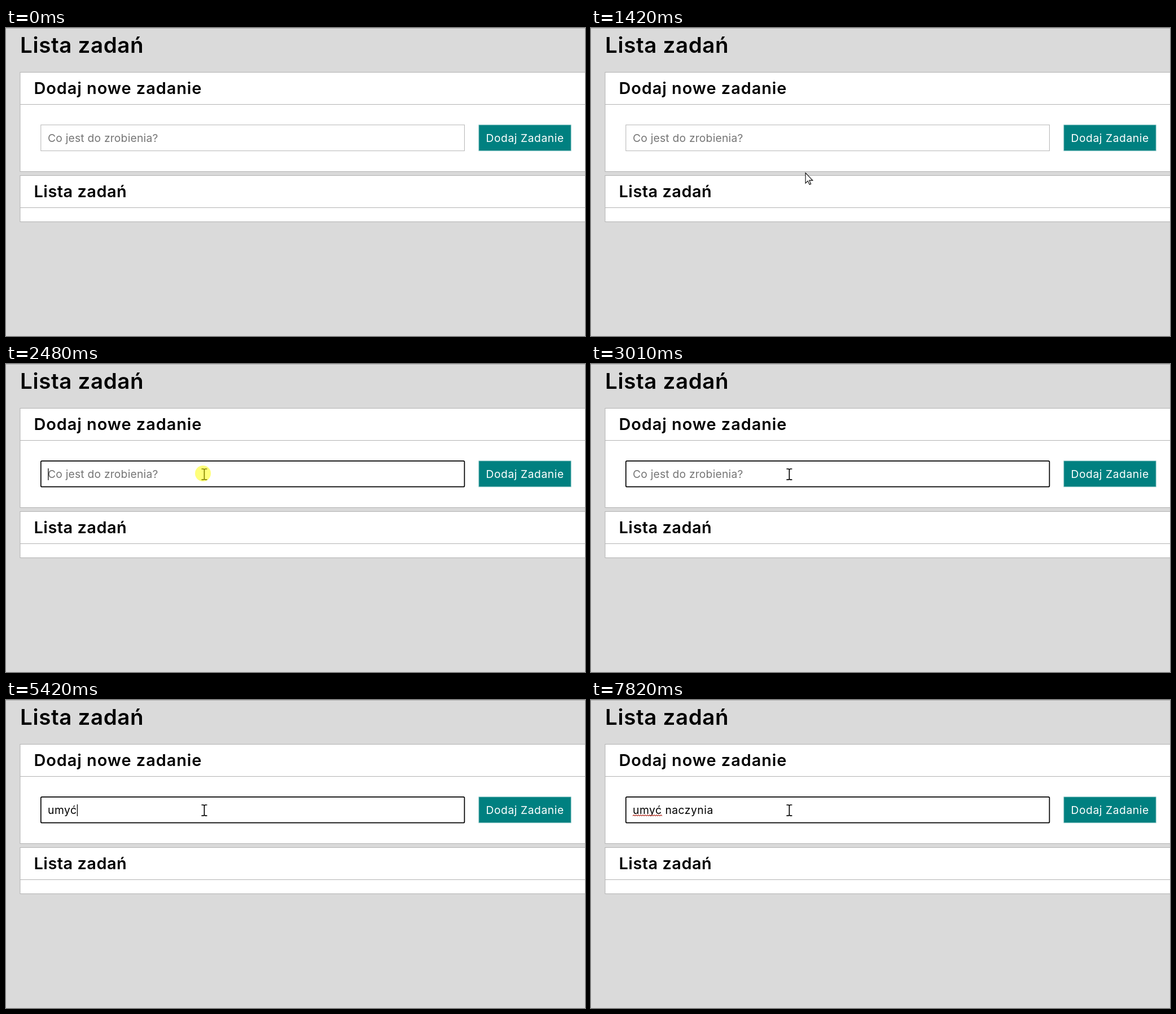
Write an HTML page that moves like this. It is 1026 by 546 pixels and loops after 8000 ms.

```html
<!DOCTYPE html>
<html lang="pl">
<head>
<meta charset="utf-8">
<title>Lista zadań</title>
<style>
  html, body { margin: 0; width: 100%; height: 100%; overflow: hidden; background: #dadada; }
  svg { display: block; width: 100%; height: 100%; font-family: Inter, sans-serif; }
  .title { font-size: 38.5px; font-weight: 600; letter-spacing: .65px; }
  .heading { font-size: 28.9px; font-weight: 600; letter-spacing: .5px; }
  .body { font-size: 19.3px; letter-spacing: .5px; white-space: pre; }
  .card { fill: #fff; stroke: #b2b2b2; }
  .rule { stroke: #b2b2b2; }
  #field { fill: #fff; stroke: #b4b4b4; }
  #field.focused { stroke: #000; stroke-width: 1.7px; rx: 2px; }
</style>
</head>
<body>
<svg viewBox="0 0 1026 546">
  <rect width="1026" height="546" fill="#dadada"/>
  <path class="rule" d="M0 .5H1026"/>
  <text class="title" x="25" y="44.3">Lista zadań</text>

  <rect class="card" x="25" y="78.5" width="1040" height="176"/>
  <path class="rule" d="M25 135.5H1026"/>
  <text class="heading" x="49.5" y="117" style="letter-spacing:.95px">Dodaj nowe zadanie</text>

  <rect class="card" x="25" y="261.5" width="1040" height="82"/>
  <path class="rule" d="M25 318.5H1026"/>
  <text class="heading" x="49.5" y="300">Lista zadań</text>

  <rect id="field" x="61.8" y="171.8" width="750.6" height="45.9"/>
  <text id="hint" class="body" x="74" y="202" fill="#757575" style="letter-spacing:.2px">Co jest do zrobienia?</text>
  <text id="typed" class="body" x="74" y="202"></text>
  <path id="squiggle" fill="none" stroke="#b5382c" stroke-width="1.2"/>
  <rect id="caret" y="185" width="1.25" height="21"/>

  <rect x="837.8" y="171.8" width="163.4" height="46" fill="#008080" stroke="#9cc" stroke-width=".9"/>
  <text class="body" x="850.5" y="202" fill="#fff" style="letter-spacing:.55px">Dodaj Zadanie</text>

  <path id="arrow" d="M.5 .5V18.8L4.7 14.8L7.6 21.2L10.1 20.1L7.3 13.8H13.2Z" fill="#fff" stroke="#000" stroke-width="1.1"/>
  <path id="beam" d="M-5 -9.3H-1.5L0 -8.3L1.5 -9.3H5M0 -8.5V9M-5 9.8H-1.5L0 8.8L1.5 9.8H5" fill="none" stroke="#000" stroke-width="1.7"/>
  <circle id="click" cx="349" cy="194" r="14" fill="#ff0" opacity=".52"/>
</svg>
<script>
const LOOP = 8000, FOCUS = 2480, CLICK_END = 2680, BLINK = 530;
const FIELD_BOTTOM = 219, TEXT_X = 74;
const $ = id => document.getElementById(id);
const show = (id, on) => $(id).setAttribute('visibility', on ? 'visible' : 'hidden');

// Pointer moves advance in discrete steps of `step` ms.
const moves = [
  { start: 470, step: 70, steps: 2, from: [822, 382], to: [729, 272] },
  { start: 1072.5, step: 67.5, steps: 9, from: [729, 272], to: [351.4, 195.3] }
];

// The first word is typed hesitantly, the second at a steady pace.
const phrase = 'umyć naczynia';
const slowKeys = [3830, 4030, 4890, 5420, 5820];
const keyTime = i => slowKeys[i] ?? 5980 + 187 * (i - slowKeys.length);

const lerp = (a, b, p) => a + (b - a) * p;

// Sideways motion slows down early, vertical motion picks up late.
function pointerAt(t) {
  const move = moves.filter(m => m.start <= t).pop();
  if (!move) return null;
  const p = Math.min(Math.floor((t - move.start) / move.step) / move.steps, 1);
  return [
    lerp(move.from[0], move.to[0], 1 - (1 - p) ** 3.2),
    lerp(move.from[1], move.to[1], p ** 2.7)
  ];
}

function drawPointer(t) {
  const pos = pointerAt(t);
  const inField = pos && pos[1] < FIELD_BOTTOM;
  show('arrow', pos && !inField);
  show('beam', inField);
  if (pos) $(inField ? 'beam' : 'arrow').setAttribute('transform', `translate(${pos})`);
  show('click', t >= FOCUS && t < CLICK_END);
}

function drawField(t) {
  const focused = t >= FOCUS;
  let count = 0;
  while (count < phrase.length && keyTime(count) <= t) count++;
  const lastInput = count ? keyTime(count - 1) : FOCUS;

  $('field').classList.toggle('focused', focused);
  $('typed').textContent = phrase.slice(0, count);
  $('caret').setAttribute('x', TEXT_X + .3 + $('typed').getComputedTextLength());
  show('hint', count === 0);
  show('squiggle', count > slowKeys.length);
  show('caret', focused && (t - lastInput) % (2 * BLINK) < BLINK);
}

function buildSquiggle() {
  let d = `M${TEXT_X} 205.5`;
  for (let x = TEXT_X + 2; x <= 126; x += 2) d += `L${x} ${x % 4 ? 205.5 : 203.7}`;
  $('squiggle').setAttribute('d', d);
}

buildSquiggle();
const start = performance.now();
function tick() {
  const t = (performance.now() - start) % LOOP;
  drawPointer(t);
  drawField(t);
  requestAnimationFrame(tick);
}
tick();
</script>
</body>
</html>
```
